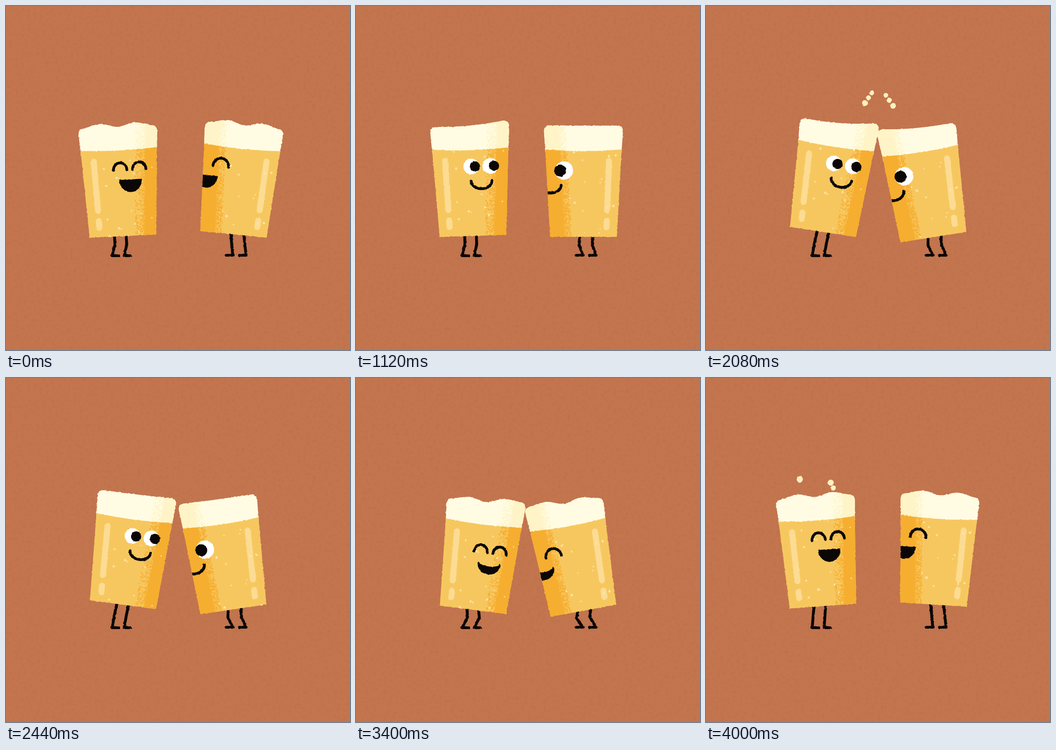
Recreate the animation shown at these times as an HTML page with a canvas. Size 748 by 748 pixels, loop 4.04 s.

```html
<!DOCTYPE html>
<html lang="en">
<head>
<meta charset="utf-8">
<title>Cheers</title>
<style>
html, body { margin: 0; width: 100%; height: 100%; overflow: hidden; background: #c3754e; }
svg, canvas { position: absolute; left: 0; top: 0; }
canvas { filter: url(#rough); }
</style>
</head>
<body>
<svg width="100%" height="100%">
  <filter id="paper" x="0" y="0" width="1" height="1">
    <feTurbulence type="fractalNoise" baseFrequency=".15" numOctaves="3" seed="4"/>
    <feColorMatrix values="0 0 0 0 0  0 0 0 0 0  0 0 0 0 0  0 0 0 .07 -.03"/>
  </filter>
  <filter id="rough" x="0" y="0" width="1" height="1" color-interpolation-filters="sRGB">
    <feTurbulence type="fractalNoise" baseFrequency=".2" numOctaves="2" seed="2" result="n"/>
    <feDisplacementMap in="SourceGraphic" in2="n" scale="3" xChannelSelector="R" yChannelSelector="G"/>
  </filter>
  <rect width="100%" height="100%" filter="url(#paper)"/>
</svg>
<canvas id="stage" width="748" height="748"></canvas>
<script>
const ctx = document.getElementById('stage').getContext('2d');
const LOOP = 4040, STEP = 40, BEER = 190, INK = '#0b0706';
const CLINK = 1920, OPEN_EYES = 1000, SHUT_EYES = 3340;
const clamp = v => Math.max(0, Math.min(1, v));
const smooth = v => clamp(v) ** 2 * (3 - 2 * clamp(v));
const wall = y => 72.5 - y * .0553; // half width of the glass at local height y

let seed = 7;
const rnd = () => (seed = seed * 16807 % 2147483647) / 2147483647;
const between = (a, b) => a + (b - a) * rnd();
const make = (n, f) => Array.from({ length: n }, (_, i) => f(i));

// Beats: time, lean in degrees, height of the base
const left = {
  x: 254.3, side: 1, shade: 26, grain: 22,
  foot: 231, floor: 543, gap: 26, hip: -17, sway: .55,
  eyes: [1, 42.5], eye: 17, lash: 14.5, mouth: 22.5, laugh: -2.6,
  beats: [
    [0, -2.8, 500.5], [520, -2.8, 498.5], [960, -.5, 499], [1120, -1.8, 500],
    [1680, -11, 497], [1800, -3.9, 493], [CLINK, 9, 491], [2440, 7.5, 493],
    [3200, 7.5, 493], [3400, 7.1, 504], [3600, -4.5, 493], [4000, -4.1, 496]
  ]
};
const right = {
  x: 494.6, side: -1, shade: 34, grain: 14,
  foot: 493, floor: 542, gap: 29, hip: -8, sway: .4,
  eyes: [-42.5], eye: 20, lash: 17, mouth: -71, laugh: -1.6,
  beats: [
    [0, 5.8, 496.5], [520, 5, 496], [1120, 0, 502],
    [1680, 6.8, 494], [1800, 5.7, 494], [CLINK, -9, 502], [2440, -8.4, 503],
    [3200, -8.4, 503], [3400, -10.4, 506], [3600, 5.2, 491], [4000, 3.6, 492.6]
  ]
};

function shadePath(g) {
  const p = new Path2D(), s = g.side, top = -280;
  p.moveTo(s * 100, 0);
  p.lineTo(s * (wall(0) - g.shade), 0);
  p.lineTo(s * (wall(top) - g.shade), top);
  p.lineTo(s * 100, top);
  for (let i = 0; i < 750; i++) {
    const y = rnd() * top, d = g.shade - 1 + g.grain * rnd() ** 1.6;
    p.rect(s * (wall(y) - d) - 1, y, 2.2, 2.2);
  }
  return p;
}
for (const g of [left, right]) {
  g.shadePath = shadePath(g);
  g.bubbles = make(9, () => [between(-.9, .9), between(0, 110), between(1.3, 2.6)]);
}

// Drops hop from the foam while laughing and fly apart when the glasses meet
const hop = start => ({
  start, life: 400, x: (rnd() < .5 ? 240 : 515) + between(-45, 45), y: 268,
  height: between(28, 55), dx: between(-16, 16), r: between(5, 7)
});
const drops = [
  ...make(4, i => hop(80 + i * 125)),
  ...make(3, i => hop(3780 + i * 40)),
  ...make(6, i => ({
    start: CLINK + 40, life: 480 - i * 15, x: 374, y: 273,
    height: 112 - i * 9, dx: (i % 2 ? 1 : -1) * (55 + i * 11), r: between(5, 7)
  }))
];

// Monotone cubic through the beats
function poseAt(rows, t) {
  let i = 0;
  while (i < rows.length - 2 && t >= rows[i + 1][0]) i++;
  const slope = (k, c) => rows[k] && rows[k + 1]
    ? (rows[k + 1][c] - rows[k][c]) / (rows[k + 1][0] - rows[k][0]) : 0;
  const tangent = (k, c) => {
    const a = slope(k - 1, c), b = slope(k, c);
    return a * b > 0 ? 2 * a * b / (a + b) : 0;
  };
  const a = rows[i], b = rows[i + 1], h = b[0] - a[0], p = clamp((t - a[0]) / h), q = 1 - p;
  return a.map((v, c) => v * (1 + 2 * p) * q * q + b[c] * p * p * (3 - 2 * p)
    + h * p * q * (tangent(i, c) * q - tangent(i + 1, c) * p));
}

const shake = t => t < 780 ? Math.sin(Math.PI * t / 260) ** 2 : 0;
const eyesShut = t => t < OPEN_EYES || t >= SHUT_EYES;

// Foam lags behind the lean, sloshes after the clink and ripples with laughter
function foamAt(g, t) {
  const speed = (poseAt(g.beats, t + 20)[1] - poseAt(g.beats, t - 20)[1]) * 25;
  const after = Math.max(0, t - CLINK);
  const tilt = -22 * Math.tanh(speed / 25)
    + g.side * 24 * Math.exp(-after / 200) * Math.sin(after / 70);
  const ripple = eyesShut(t) ? 4 : 0;
  return make(5, i => {
    const u = i / 2 - 1;
    return 52 + tilt * u / 2 + Math.abs(tilt) * .2 * (2 * u * u - 1)
      - ripple * Math.cos(2 * Math.PI * u);
  });
}

function line(pts, width, color) {
  ctx.beginPath();
  pts.forEach(p => ctx.lineTo(p[0], p[1]));
  ctx.lineWidth = width;
  ctx.strokeStyle = color;
  ctx.stroke();
}

function dot(x, y, r, color) {
  ctx.beginPath();
  ctx.arc(x, y, r, 0, 7);
  ctx.fillStyle = color;
  ctx.fill();
}

function fillShaded(path, base, dark, g) {
  ctx.fillStyle = base;
  ctx.fill(path);
  ctx.save();
  ctx.clip(path);
  ctx.fillStyle = dark;
  ctx.fill(g.shadePath);
  ctx.restore();
}

function beerPath() {
  const p = new Path2D(), w = wall(-BEER);
  p.moveTo(-wall(0), 0);
  p.lineTo(-w, -BEER);
  p.quadraticCurveTo(0, 7 - BEER, w, -BEER);
  p.lineTo(wall(0), 0);
  p.closePath();
  return p;
}

function foamPath(heights) {
  const p = new Path2D(), ys = heights.map(h => -BEER - h), low = 8 - BEER, round = 13;
  const a = -wall(ys[0]), b = wall(ys[4]);
  const at = i => {
    const k = Math.max(0, Math.min(4, i));
    return [a + round + (b - a - 2 * round) * k / 4, ys[k]];
  };
  p.moveTo(-wall(low), low);
  p.lineTo(a, ys[0] + round);
  p.quadraticCurveTo(a, ys[0], ...at(0));
  for (let i = 0; i < 4; i++) {
    const [o, m, n, e] = [at(i - 1), at(i), at(i + 1), at(i + 2)];
    p.bezierCurveTo(m[0] + (n[0] - o[0]) / 6, m[1] + (n[1] - o[1]) / 6,
      n[0] - (e[0] - m[0]) / 6, n[1] - (e[1] - m[1]) / 6, n[0], n[1]);
  }
  p.quadraticCurveTo(b, ys[4], b, ys[4] + round);
  p.lineTo(wall(low), low);
  p.closePath();
  return p;
}

function drawFace(g, y, t) {
  const open = t < CLINK ? clamp((OPEN_EYES + 40 - t) / 140) : clamp((t - SHUT_EYES) / 140);
  for (const x of g.eyes) {
    if (eyesShut(t)) {
      ctx.beginPath();
      ctx.ellipse(x, y + 7, g.lash, g.lash + 1, 0, Math.PI, 0);
      ctx.lineWidth = 6;
      ctx.strokeStyle = INK;
      ctx.stroke();
    } else {
      dot(x, y, g.eye, '#fff');
      dot(x + 8 * g.side, y, g.eye * .65, INK);
    }
  }
  const my = y + 32 - 3 * open, w = 22.5 + 1.5 * open;
  ctx.beginPath();
  ctx.ellipse(g.mouth, my, w, 17 + 9.5 * open, 0, 0, Math.PI);
  ctx.ellipse(g.mouth, my, w, 17 * (1 - open) ** 1.5, 0, Math.PI, 0, true);
  ctx.closePath();
  ctx.lineWidth = 6 - 5 * open;
  ctx.fillStyle = ctx.strokeStyle = INK;
  ctx.fill();
  ctx.stroke();
}

function drawGlass(g, t) {
  let [, angle, y] = poseAt(g.beats, t);
  angle += g.laugh * shake(t);
  y -= 4.5 * shake(t);
  const turn = angle * Math.PI / 180;
  const knee = g.side * Math.max(0, y - 496) * .8;

  for (const i of [0, 1]) {
    const dx = g.hip + g.sway * angle + i * (g.gap - .7), fx = g.foot + i * g.gap;
    const hx = g.x + dx, hy = y + dx * Math.tan(turn) - 2;
    line([[hx, hy], [(hx + fx) / 2 + knee, hy + (g.floor - hy) * .45],
      [fx, g.floor], [fx + 14 * g.side, g.floor]], 6.2, INK);
  }

  ctx.save();
  ctx.translate(g.x, y);
  ctx.rotate(turn);
  const beer = beerPath();
  fillShaded(foamPath(foamAt(g, t)), '#fffce3', '#fff4c7', g);
  fillShaded(beer, '#f7c75f', '#f6ae30', g);
  ctx.clip(beer);
  for (const [top, bottom] of [[-165, -58], [-35, -21]]) {
    line([top, bottom].map(v => [-g.side * .68 * wall(v), v]), 13, '#fcdc93');
  }
  for (const [x, start, r] of g.bubbles) {
    for (let h = (start + t * .0324) % 110; h < BEER; h += 110) {
      dot(x * wall(-h), -h, r, '#fde5a4');
    }
  }
  drawFace(g, -151 + 17 * smooth((y - 500.5) / 3.5), t);
  ctx.restore();
}

function draw(t) {
  ctx.clearRect(0, 0, 748, 748);
  ctx.lineCap = ctx.lineJoin = 'round';
  for (const d of drops) {
    const p = (t - d.start) / d.life;
    if (p > 0 && p < 1) dot(d.x + d.dx * p, d.y - d.height * 4 * p * (1 - p), d.r, '#fff0c0');
  }
  drawGlass(left, t);
  drawGlass(right, t);
}

const began = performance.now();
function tick() {
  const t = (performance.now() - began) % LOOP;
  draw(Math.floor(t / STEP) * STEP);
  requestAnimationFrame(tick);
}
tick();
</script>
</body>
</html>
```
